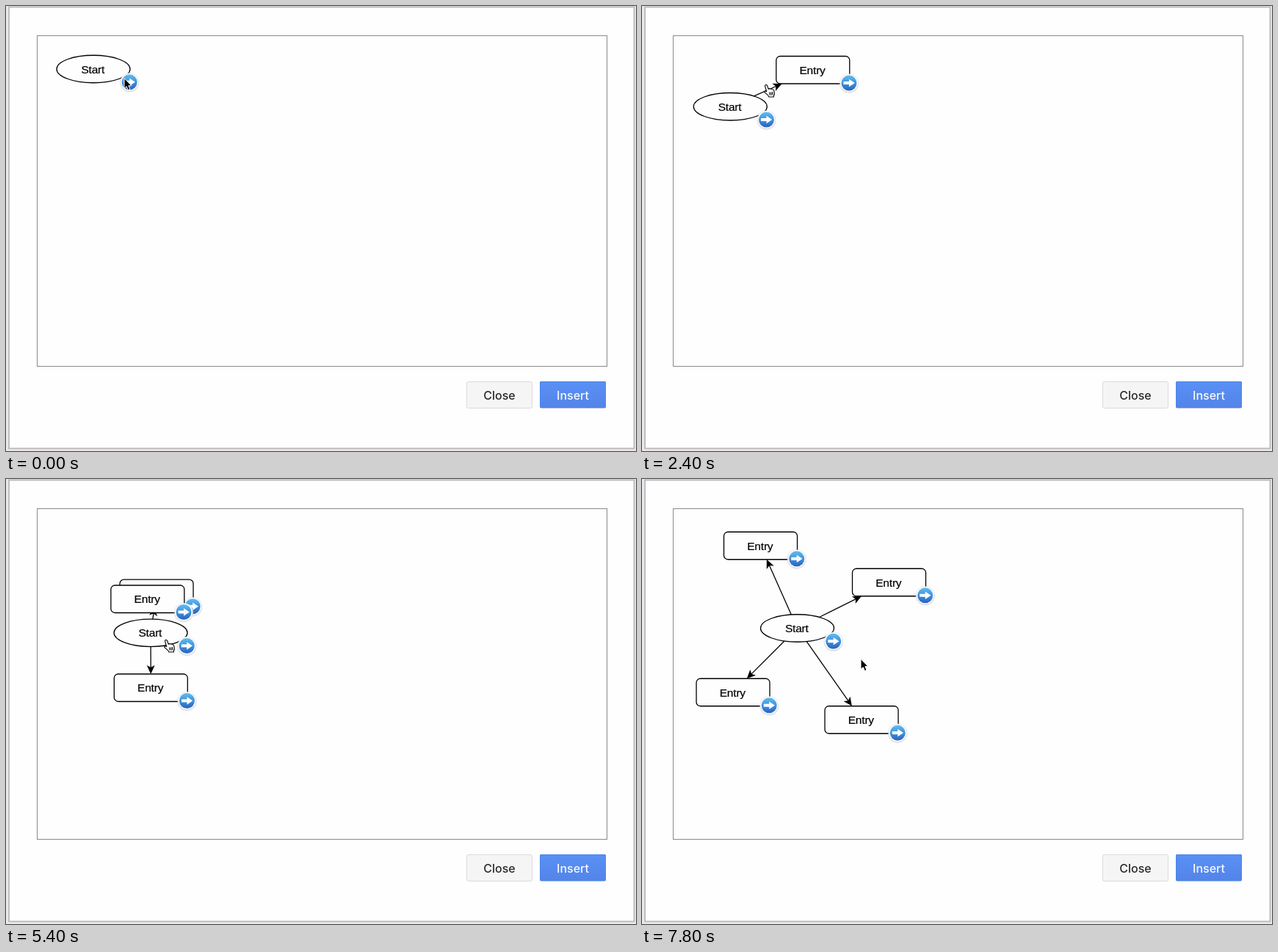
Animation of 858 by 607 pixels, one loop 8000 ms. Source, as an HTML page:

```html
<!DOCTYPE html>
<html lang="en">
<head>
<meta charset="utf-8">
<title>Growing diagram</title>
<style>
  html, body { margin: 0; width: 100%; height: 100%; overflow: hidden; background: #e9e9ec; }
  svg { display: block; }
  text { text-anchor: middle; }
  .label { font: 15.5px "Liberation Sans", Arial, sans-serif; letter-spacing: -.2px; stroke: #000; stroke-width: .2; }
  .button { font: 500 16px Inter, Roboto, sans-serif; }
  .shape { fill: #fefefe; stroke: #000; stroke-width: 1.3; }
</style>
</head>
<body>
<svg width="858" height="607" viewBox="0 0 858 607">
  <defs>
    <linearGradient id="ball" x2="0" y2="1">
      <stop stop-color="#62bdf0"/><stop offset=".5" stop-color="#3f92dc"/><stop offset="1" stop-color="#2b62bd"/>
    </linearGradient>
    <linearGradient id="blue" x2="0" y2="1">
      <stop stop-color="#5990f5"/><stop offset="1" stop-color="#5484e8"/>
    </linearGradient>
    <radialGradient id="halo">
      <stop offset=".82" stop-color="#d4d4d8"/><stop offset="1" stop-color="#d4d4d8" stop-opacity="0"/>
    </radialGradient>
    <g id="icon">
      <circle cy=".6" r="14" fill="url(#halo)"/>
      <circle r="12" fill="#fcfcfd"/>
      <circle r="10.5" fill="url(#ball)"/>
      <path d="M-7.5-2H0V-5.2L7.8 0 0 5.2V2H-7.5Z" fill="#fff"/>
    </g>
  </defs>

  <rect y="605" width="858" height="2" fill="#f1e7e4"/>
  <rect x="4" y="1.5" width="851.5" height="602" fill="#fefefe" stroke="#b9b9bd" stroke-width="1.8"/>
  <rect x="42.5" y="40.5" width="776" height="451" fill="#fefefe" stroke="#88888f"/>

  <rect x="627.5" y="512.5" width="89" height="36" rx="2" fill="#f5f5f6" stroke="#dadadd"/>
  <text class="button" x="672" y="536.5" fill="#2a2a2c">Close</text>
  <rect x="727" y="512" width="90" height="36.6" rx="2" fill="#5675b8"/>
  <rect x="727.5" y="512.5" width="89" height="35" rx="1.5" fill="url(#blue)" stroke="#4b86ec"/>
  <text class="button" x="772" y="536.5" fill="#f6f9ff">Insert</text>

  <path id="lines" fill="none" stroke="#000" stroke-width="1.3"/>
  <path id="heads"/>
  <g id="nodes"></g>

  <path id="arrow" d="M0 0V14L3.2 11.2 5.4 16.2 8 15 5.8 10.2H10Z" fill="#000" stroke="#fff" stroke-width="1"/>
  <g id="hand" fill="#fff" stroke="#000" stroke-width="1.1" stroke-linejoin="round" stroke-linecap="round">
    <path d="M.5 2Q1-.2 2.8 .8 3.5 1.2 3.8 2.3L5.2 6.4Q6.2 5 7.6 6.2 9 5.2 10.1 6.8 12.2 6.3 12.7 8.4L13.4 11.8Q13.6 13.8 12.4 15.4V17H5.8Q5.2 15.2 3.4 13.7L-.2 10.6Q-.8 8.7 1.5 9.1L2.7 9.8Z"/>
    <path d="M6.6 11L7 14.3M8.7 10.8L9 14.2M10.7 10.6L11 14"/>
  </g>
  <rect id="dot" width="1" height="1"/>
</svg>
<script>
const LOOP = 8000, MOVE = 600, HALF_W = 50, HALF_H = 18.75;
const $ = id => document.getElementById(id);

// Each layout: start of its transition, then centres of the Start node and its entries.
const layouts = [
  { at: 0, pos: [[119, 86]] },
  { at: 1800, pos: [[120.25, 137.25], [232.75, 87.25]] },
  { at: 3600, pos: [[171.5, 201], [246.5, 88.5], [121.5, 288.5]] },
  { at: 5200, pos: [[247.75, 227.25], [122.75, 289.75], [347.75, 277.25], [235.25, 89.75]] },
  { at: 6600, pos: [[211.5, 203.5], [124, 291], [299, 328.5], [161.5, 91], [336.5, 141]] }
];

// Pointer stops: time, tip x, tip y.
const stops = [
  [200, 161, 98.5], [1200, 168.5, 104.5], [1400, 167, 107], [3000, 167, 107],
  [3400, 166, 156], [4200, 166, 156], [4900, 216, 219], [5800, 216, 219],
  [6300, 296, 244], [7300, 296, 244], [7500, 298, 245.5]
];
const handSpans = [[1300, 3050], [3300, 4250], [4800, 5850], [6200, 7350]];

const mix = (a, b, u) => a + (b - a) * u;
const clamp = u => Math.max(0, Math.min(1, u));
const place = (el, x, y) => el.setAttribute("transform", `translate(${x} ${y})`);
const show = (el, on) => el.setAttribute("visibility", on ? "visible" : "hidden");

const nodes = [0, 1, 2, 3, 4].map(i => {
  const g = document.createElementNS("http://www.w3.org/2000/svg", "g");
  const shape = i
    ? `<rect class="shape" x="${-HALF_W}" y="${-HALF_H}" width="${2 * HALF_W}" height="${2 * HALF_H}" rx="5.5"/>`
    : `<ellipse class="shape" rx="${HALF_W}" ry="${HALF_H}"/>`;
  g.innerHTML = `${shape}<text class="label" x="-.7" y="5.6">${i ? "Entry" : "Start"}</text>
    <use href="#icon" x="49.2" y="17.8"/>`;
  $("nodes").append(g);
  return g;
});

function centres(t) {
  const k = layouts.findLastIndex(l => t >= l.at);
  const { at, pos } = layouts[k];
  if (!k) return pos;
  const prev = layouts[k - 1].pos, u = clamp((t - at) / MOVE);
  // A new entry grows out of the Start node.
  return pos.map((p, i) => p.map((v, axis) => mix((prev[i] || prev[0])[axis], v, u)));
}

function drawEdges([start, ...entries]) {
  let lines = "", heads = "";
  for (const end of entries) {
    const dx = end[0] - start[0], dy = end[1] - start[1], len = Math.hypot(dx, dy);
    if (!len) continue;
    const out = len / Math.hypot(dx / HALF_W, dy / HALF_H);
    const tip = len - len * Math.min(HALF_W / Math.abs(dx), HALF_H / Math.abs(dy));
    if (tip - out < 10) continue;
    const at = (along, side = 0) =>
      `${start[0] + (dx * along - dy * side) / len} ${start[1] + (dy * along + dx * side) / len}`;
    lines += `M${at(out)}L${at(tip - 8)}`;
    heads += `M${at(tip)}L${at(tip - 12, 5.5)}L${at(tip - 9)}L${at(tip - 12, -5.5)}Z`;
  }
  $("lines").setAttribute("d", lines);
  $("heads").setAttribute("d", heads);
}

function pointer(t) {
  const i = stops.findIndex(s => s[0] > t);
  if (i < 0) return stops.at(-1).slice(1);
  const b = stops[i], a = stops[i - 1] || b;
  const u = a === b ? 0 : (t - a[0]) / (b[0] - a[0]);
  return [mix(a[1], b[1], u), mix(a[2], b[2], u)];
}

function draw(t) {
  const pos = centres(t);
  nodes.forEach((node, i) => {
    show(node, i < pos.length);
    if (pos[i]) place(node, ...pos[i]);
  });
  drawEdges(pos);

  const tip = pointer(t), isHand = handSpans.some(([a, b]) => t >= a && t < b);
  place($("arrow"), ...tip);
  place($("hand"), ...tip);
  show($("arrow"), !isHand);
  show($("hand"), isHand);
  show($("dot"), t >= 2800 && t < 4400);
}

const began = performance.now();
function tick() {
  draw((performance.now() - began) % LOOP);
  requestAnimationFrame(tick);
}
tick();
</script>
</body>
</html>
```
